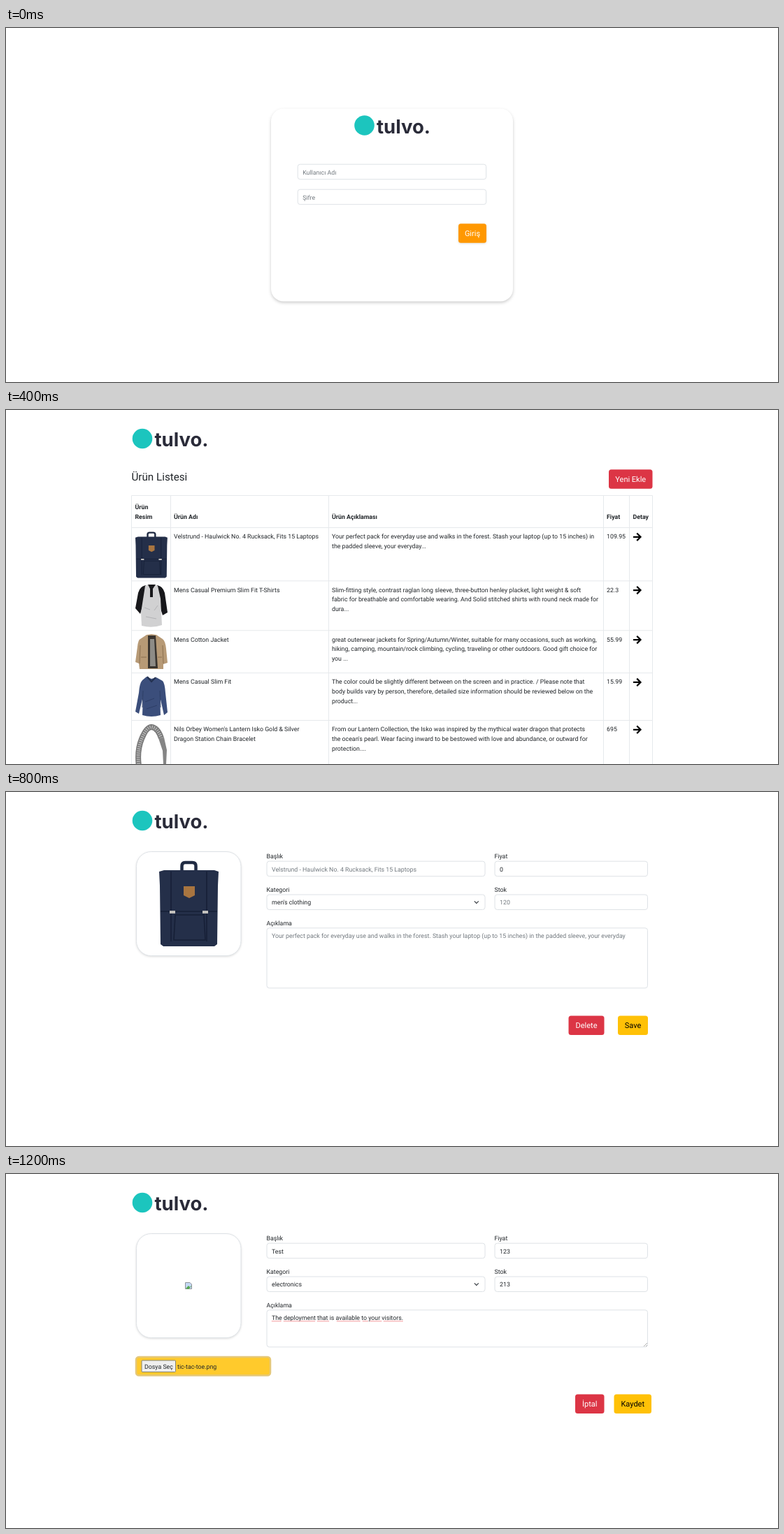
Recreate the animation shown at these times as an HTML page. Size 1104 by 507 pixels, loop 1.6 s.

```html
<!DOCTYPE html>
<html lang="tr">
<head>
<meta charset="utf-8">
<style>
  html, body { margin: 0; width: 100%; height: 100%; overflow: hidden; background: #fff; }
  svg { display: block; width: 1104px; height: 507px; }
  text { font: 8.8px Roboto, "Open Sans", sans-serif; fill: #212529; text-rendering: geometricPrecision; }
  text.muted { fill: #72797f; }
  text.bold { font-weight: 700; }
  text.title { font-size: 15.2px; }
  text.button { font-size: 11px; text-anchor: middle; }
  text.brand { font: 700 27.500px Inter, sans-serif; fill: #2a2b39; }
  .box { fill: #fff; stroke: #dee2e6; }
  .grid { fill: none; stroke: #e6e9ec; }
  .icon { fill: none; stroke: #000; stroke-width: 2.2; }
  .thin { fill: none; stroke: #343a40; stroke-width: 1.2; }
  .spell { stroke: #f0787c; stroke-dasharray: 1.5 .5; }
  .lift { filter: drop-shadow(0 1.5px 1.5px #0002); }
  .card { fill: #fff; filter: drop-shadow(0 2px 2px #0003); }
</style>
</head>
<body>
<svg id="stage" viewBox="0 0 1104 507">
  <defs>
    <g id="logo">
      <circle cx="15.5" cy="13" r="14.3" fill="#1cc5be"/>
      <text class="brand" x="33" y="24">tulvo.</text>
    </g>
    <g id="backpack">
      <path d="M251.500 115V106q0-5 5-5h10q5 0 5 5v9" fill="none" stroke="#202b43" stroke-width="4.500"/>
      <path d="M219 114l7-2h72l6 2-1 20-1 84-4 3h-73l-4-3-1-84z" fill="#242f49"/>
      <path d="M221 171h81M236 114v100M287 114v100M242 176h41l2 36h-45z" fill="none" stroke="#161f36" stroke-width="1.500"/>
      <path d="M254 135h16v13l-8 4-8-4z" fill="#a87540"/>
      <path d="M234 170h8v4h-8zM281 170h8v4h-8z" fill="#c3c1bd"/>
    </g>
  </defs>
</svg>
<script>
const text = (x, y, str, cls = '') =>
  `<text x="${x}" y="${y}" class="${cls}">${str.replace(/&/g, '&amp;')}</text>`;
const lines = (x, y, rows) => rows.map((row, i) => text(x, y + i * 13.8, row)).join('');
const rect = (x, y, w, h, r, attrs) =>
  `<rect x="${x}" y="${y}" width="${w}" height="${h}" rx="${r}" ${attrs}/>`;
const path = (d, attrs) => `<path d="${d}" ${attrs}/>`;
const use = (id, transform) => `<use href="#${id}" transform="${transform}"/>`;
const button = (x, y, w, label, fill, ink, cls = '') =>
  rect(x, y, w, 27.5, 3.5, `fill="${fill}" class="${cls}"`) +
  `<text x="${x + w / 2}" y="${y + 17.7}" class="button" style="fill:${ink}">${label}</text>`;
const input = (x, y, w, value, cls, h = 21.5) =>
  rect(x, y, w, h, 3.5, 'class="box"') + text(x + 7, y + 14.3, value, cls);

const header = use('logo', 'translate(179.5 28)');
const RED = '#dc3545', YELLOW = '#ffc107';
const product = 'Velstrund - Haulwick No. 4 Rucksack, Fits 15 Laptops';
const pitch = 'Your perfect pack for everyday use and walks in the forest. Stash your laptop (up to 15 inches) in';

function login() {
  return rect(379, 115.5, 346, 276, 18, 'class="card"') +
    use('logo', 'translate(497 126.500)') +
    input(417.2, 195.2, 269.5, 'Kullanıcı Adı', 'muted') +
    input(417.2, 231.2, 269.5, 'Şifre', 'muted') +
    button(647, 280.3, 40, 'Giriş', '#ff9800', '#fff', 'lift');
}

const garments = [
  use('backpack', 'translate(66.700 121.100) scale(.54)'),
  path('M200 251q-9 2-11 11l-4 22 7 8 6-20zM216 251q9 2 11 11l4 28-7 4-7-22z', 'fill="#18181b"') +
    path('M199 252l4-2h9l5 2 4 18 2 38q-14 5-29 1l-1-19z', 'fill="#d1d1d2"') +
    path('M203 250h11l-4 6v12h-4v-12z', 'fill="#18181b"') +
    path('M198 283l8 3M200 296l15 3M217 280l-5 7', 'fill="none" stroke="#b2b2b5"'),
  path('M201 322l7-1 7 1 9 6q4 3 5 14l2 20-6 2v7h-34l-1-8-5-2 3-22q1-10 4-11z', 'fill="#b79a76"') +
    path('M203 323h11l3 47h-14z', 'fill="#39342f"') +
    path('M206 328h6l2 39h-8z', 'fill="#8d8b86"') +
    path('M192 337l-1 26M224 337l1 26M193 354h8M217 354h6', 'stroke="#8b7050" fill="none"'),
  path('M201 382l7 3 7-2 9 5q3 3 4 17l3 28-5 4-6-27 1 27q-13 4-26 0l1-27-6 25-5-3 5-27q1-14 5-18z', 'fill="#3b4e7b"') +
    path('M202 382l6 7 6-6', 'fill="none" stroke="#22304f" stroke-width="2"') +
    path('M196 402l-1 24M220 402l1 24M199 418l13-5M201 428l15-5', 'fill="none" stroke="#2d3e66"'),
  ['stroke="#777" stroke-width="8"', 'stroke="#b6b6b6" stroke-width="5" stroke-dasharray="1.5 1.5"']
    .map(s => path('M190 510q-3-22 4-39t14-17q9 1 14 16', `fill="none" ${s}`)).join('') +
    path('M218 470l8-1 4 18-1 20h-4l-1-19z', 'fill="#858585"')
];

const items = [
  [168.5, [product], [pitch, 'the padded sleeve, your everyday...'], '109.95'],
  [244.8, ['Mens Casual Premium Slim Fit T-Shirts'],
    ['Slim-fitting style, contrast raglan long sleeve, three-button henley placket, light weight & soft',
     'fabric for breathable and comfortable wearing. And Solid stitched shirts with round neck made for', 'dura...'], '22.3'],
  [315.8, ['Mens Cotton Jacket'],
    ['great outerwear jackets for Spring/Autumn/Winter, suitable for many occasions, such as working,',
     'hiking, camping, mountain/rock climbing, cycling, traveling or other outdoors. Good gift choice for', 'you ...'], '55.99'],
  [376.6, ['Mens Casual Slim Fit'],
    ['The color could be slightly different between on the screen and in practice. / Please note that',
     'body builds vary by person, therefore, detailed size information should be reviewed below on the', 'product...'], '15.99'],
  [444.5, ["Nils Orbey Women's Lantern Isko Gold & Silver", 'Dragon Station Chain Bracelet'],
    ['From our Lantern Collection, the Isko was inspired by the mythical water dragon that protects',
     "the ocean's pearl. Wear facing inward to be bestowed with love and abundance, or outward for", 'protection....'], '695']
];

function list() {
  const columns = [179.5, 235.5, 461.5, 854.5, 891.5, 924.5];
  const heads = [[184.5, 142.3, 'Ürün'], [184.5, 156.1, 'Resim'], [240, 156.1, 'Ürün Adı'],
    [466, 156.1, 'Ürün Açıklaması'], [859, 156.1, 'Fiyat'], [896.5, 156.1, 'Detay']];
  return header + text(179.5, 100.7, 'Ürün Listesi', 'title') +
    button(862, 85.2, 62.5, 'Yeni Ekle', RED, '#fff') +
    path(columns.map(x => `M${x} 122.5V507`).join('') +
      [122.5, ...items.map(item => item[0])].map(y => `M179.500 ${y}H924.5`).join(''), 'class="grid"') +
    heads.map(h => text(...h, 'bold')).join('') +
    items.map(([y, name, about, price], i) =>
      garments[i] + lines(240, y + 15.8, name) + lines(466, y + 15.8, about) + text(859, y + 15.8, price) +
      path(`M897 ${y + 13.3}h10.500m-5.300-5.300l5.300 5.300-5.300 5.300`, 'class="icon"')).join('');
}

function form(title, price, category, stock, about, height, hint) {
  return header + rect(186.5, 85.5, 149.5, 149, 21, 'class="box lift"') +
    [[372.5, 95.3, 'Başlık'], [698.5, 95.3, 'Fiyat'], [372.5, 143.2, 'Kategori'],
     [698.5, 143.2, 'Stok'], [372.5, 191, 'Açıklama']].map(l => text(...l)).join('') +
    input(373, 99.2, 312, title, hint) + input(699, 99.2, 218.5, price) +
    input(373, 147, 312, category) + input(699, 147, 218.5, stock, hint) +
    input(373, 194.8, 544.5, about, hint, height) +
    path('M669.800 156.300l3 3 3-3', 'class="thin"');
}

function edit() {
  return form(product, '0', "men's clothing", '120', pitch + ' the padded sleeve, your everyday', 86, 'muted') +
    '<use href="#backpack"/>' +
    button(804.5, 320.5, 51, 'Delete', RED, '#fff') + button(875, 320.5, 43, 'Save', YELLOW, '#000');
}

function create() {
  const flagged = [[380, 394], [397, 442], [445, 462], [473, 507], [510, 518], [520, 537], [540, 568]];
  return form('Test', '123', 'electronics', '213', 'The deployment that is available to your visitors.', 53, '') +
    path(flagged.map(([a, b]) => `M${a} 210.800H${b}`).join(''), 'class="spell"') +
    path('M912 247l5-5M915 247l2-2', 'class="thin" style="stroke:#999;stroke-width:.8"') +
    path('M256.500 155.500h6.500l2.500 2.500v6.500h-9z', 'fill="#c5d8f5" stroke="#8f9499"') +
    path('M257 164l4-4 2 2 2-2v1l-4 4z', 'fill="#55a84f"') +
    rect(186, 262, 192, 26.5, 4, 'fill="#ffca2c" stroke="#e5c878" stroke-width="2.500"') +
    rect(194, 267, 48.5, 16.5, 1, 'fill="#efefef" stroke="#85836f"') +
    text(198, 278.5, 'Dosya Seç') + text(245, 278.5, 'tic-tac-toe.png') +
    button(814, 315.5, 41.5, 'İptal', RED, '#fff') + button(869.5, 315.5, 53.5, 'Kaydet', YELLOW, '#000');
}

const stage = document.getElementById('stage');
stage.insertAdjacentHTML('beforeend', [login, list, edit, create].map(s => `<g class="scene">${s()}</g>`).join(''));
const scenes = stage.querySelectorAll('.scene');
const start = performance.now();

function draw() {
  const current = Math.floor((performance.now() - start) % 1600 / 400);
  scenes.forEach((scene, i) => { scene.style.display = i === current ? '' : 'none'; });
  requestAnimationFrame(draw);
}
draw();
</script>
</body>
</html>
```
